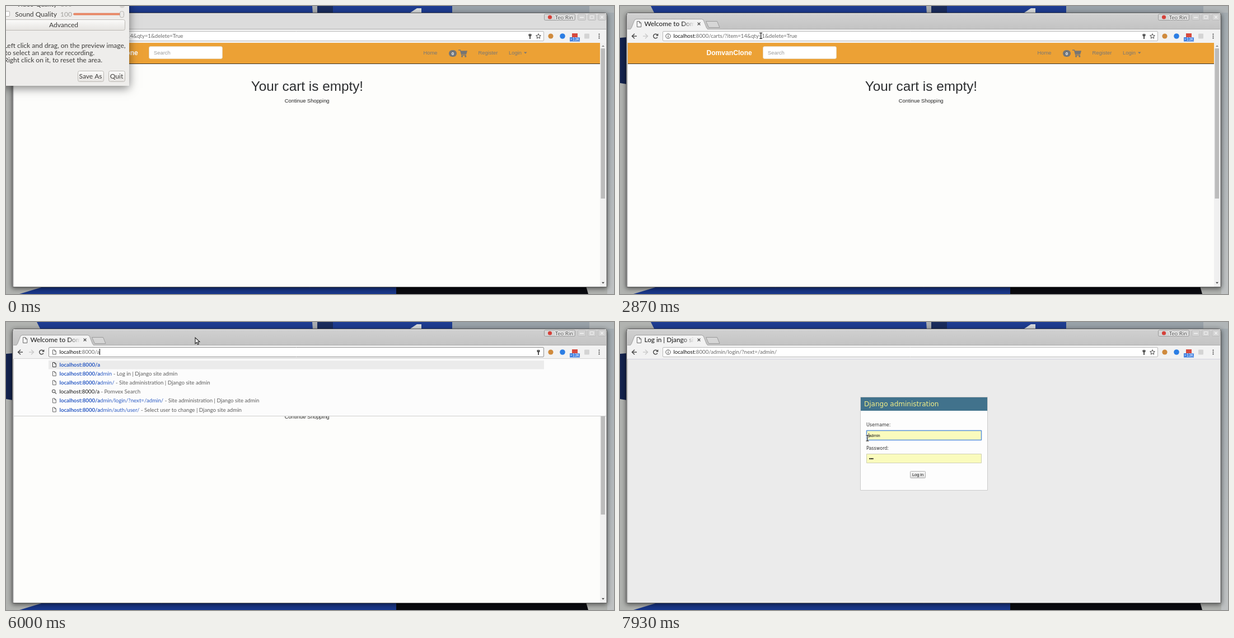
Write an HTML page with a canvas that moves like this. It is 1086x516 px and loops after 8 s.

```html
<!DOCTYPE html>
<html lang="en">
<head>
<meta charset="utf-8">
<title>Cart and admin login</title>
<style>
html, body { margin: 0; width: 100%; height: 100%; overflow: hidden; background: #b0b2b0; }
canvas { display: block; }
</style>
</head>
<body>
<canvas id="stage" width="1086" height="516"></canvas>
<script>
const ctx = document.getElementById('stage').getContext('2d');
const LOOP = 8000;
const UI = 'Lato, "Open Sans", sans-serif';
const WEB = '"Liberation Sans", Arial, sans-serif';
const ADMIN = '"DejaVu Sans", Verdana, sans-serif';
const URL_FONT = '9.66px ' + UI;
const URL_X = 95.5;

const HOST = 'localhost';
const BASE = ':8000/';
const CART = 'carts/?item=14&qty=1&delete=True';

const SELECT = 3600, DESELECT = 4200, ERASE = 4470, ERASED = 5330;
const ENTER = 6600, LOADED = 6740;
const KEYS = [6000, 6130, 6270, 6400, 6490];

const MOUSE = [
  [700, -12, 95], [1730, 174, 38], [2000, 174, 38], [2600, 215, 53],
  [3330, 333, 54], [3600, 333, 54], [4200, 348, 54], [5450, 348, 54],
  [5600, 338, 28], [7380, 338, 28], [7530, 400, 135], [7650, 400, 135],
  [7920, 442, 208]
];

const HINTS = [
  ['admin', 'Log in | Django site admin'],
  ['admin/', 'Site administration | Django site admin'],
  null,
  ['admin/login/?next=/admin/', 'Site administration | Django site admin'],
  ['admin/auth/user/', 'Select user to change | Django site admin']
];

function rect(x, y, w, h, fill) {
  ctx.fillStyle = fill;
  ctx.fillRect(x, y, w, h);
}

function box(x, y, w, h, r, fill, stroke, width = 1) {
  ctx.beginPath();
  ctx.roundRect(x, y, w, h, r);
  if (fill) { ctx.fillStyle = fill; ctx.fill(); }
  if (stroke) { ctx.strokeStyle = stroke; ctx.lineWidth = width; ctx.stroke(); }
}

function poly(points, fill, stroke, width = 1) {
  ctx.beginPath();
  for (let i = 0; i < points.length; i += 2) ctx.lineTo(points[i], points[i + 1]);
  ctx.closePath();
  if (fill) { ctx.fillStyle = fill; ctx.fill(); }
  if (stroke) { ctx.strokeStyle = stroke; ctx.lineWidth = width; ctx.stroke(); }
}

function line(points, color, width = 1) {
  ctx.beginPath();
  for (let i = 0; i < points.length; i += 2) ctx.lineTo(points[i], points[i + 1]);
  ctx.strokeStyle = color;
  ctx.lineWidth = width;
  ctx.stroke();
}

function arc(x, y, r, color, width, from = 0, to = Math.PI * 2) {
  ctx.beginPath();
  ctx.arc(x, y, r, from, to);
  ctx.strokeStyle = color;
  ctx.lineWidth = width;
  ctx.stroke();
}

function disc(x, y, r, fill) {
  ctx.beginPath();
  ctx.arc(x, y, r, 0, Math.PI * 2);
  ctx.fillStyle = fill;
  ctx.fill();
}

// Draws text and returns the x where it ends.
function text(str, x, y, font, fill, align = 'left') {
  ctx.font = font;
  ctx.fillStyle = fill;
  ctx.textAlign = align;
  ctx.fillText(str, x, y);
  return x + ctx.measureText(str).width;
}

function vertical(y0, y1, a, b) {
  const g = ctx.createLinearGradient(0, y0, 0, y1);
  g.addColorStop(0, a);
  g.addColorStop(1, b);
  return g;
}

function cross(x, y, r, color, width) {
  line([x - r, y - r, x + r, y + r], color, width);
  line([x + r, y - r, x - r, y + r], color, width);
}

function mouseAt(t) {
  if (t < MOUSE[0][0]) return null;
  for (let i = 1; i < MOUSE.length; i++) {
    const [t0, x0, y0] = MOUSE[i - 1], [t1, x1, y1] = MOUSE[i];
    if (t < t1) {
      const p = (t - t0) / (t1 - t0), e = p * p * (3 - 2 * p);
      return { x: x0 + (x1 - x0) * e, y: y0 + (y1 - y0) * e };
    }
  }
  const [, x, y] = MOUSE[MOUSE.length - 1];
  return { x, y };
}

function pathAt(t) {
  if (t >= LOADED) return 'admin/login/?next=/admin/';
  if (t >= ENTER) return 'admin';
  if (t >= KEYS[0]) return 'admin'.slice(0, KEYS.filter(k => t >= k).length);
  if (t < ERASE) return CART;
  const gone = Math.ceil(CART.length * (t - ERASE) / (ERASED - ERASE));
  return CART.slice(0, Math.max(0, CART.length - gone));
}

function caretOn(t) {
  if (t < DESELECT || t >= ENTER) return false;
  if (t >= ERASE && t < ERASED || t >= KEYS[0]) return true;
  const since = t < ERASE ? t - DESELECT : t - ERASED;
  return since % 1000 < 500;
}

function drawDesktop() {
  rect(0, 0, 1086, 516, '#b1b3b0');
  poly([55, 0, 797, 0, 797, 14, 62, 14], '#1e3c90');
  poly([547, 0, 556, 0, 556, 14, 548, 14], '#a9acaf');
  rect(556, 0, 28, 14, '#1a2c5c');
  poly([722, 12, 734, 4, 742, 4, 742, 14, 722, 14], '#d8dbdc');
  rect(797, 0, 245, 14, '#98a1a8');
  rect(1042, 0, 44, 14, '#b0b5b7');
  poly([0, 57, 12, 56, 12, 140, 0, 138], '#14234e');
  rect(1074, 12, 12, 504, vertical(12, 504, '#a3abb0', '#bfc2c3'));
  poly([70, 502, 698, 502, 698, 516, 24, 516], '#19378a');
  poly([697, 502, 1036, 502, 1040, 516, 697, 516], '#0a0b10');
}

function pageIcon(x, y, h, color) {
  const w = h * 0.72, f = h * 0.3;
  poly([x, y, x + w - f, y, x + w, y + f, x + w, y + h, x, y + h], '#fff', color, 1);
  line([x + w - f, y, x + w - f, y + f, x + w, y + f], color, 1);
}

function drawFrame(t, mouse) {
  const active = t > 200;
  ctx.save();
  ctx.shadowColor = 'rgba(0,0,0,.55)';
  ctx.shadowBlur = 9;
  ctx.shadowOffsetY = 2;
  box(11.5, 12.5, 1062, 491, [4, 4, 1, 1], '#c9c9c9', '#5a5a5a');
  ctx.restore();
  rect(13, 14, 1059, 28, active ? vertical(14, 42, '#d0d0d0', '#c3c3c3') : '#dcdcdc');
  line([13, 13.5, 1072, 13.5], '#ececec');

  box(961.5, 14.5, 55, 11, 2, '#d6d6d6', '#9a9a9a');
  disc(971.5, 20, 3.6, '#d5413a');
  ctx.font = '10px ' + UI;
  ctx.strokeStyle = '#f5f5f5';
  ctx.lineWidth = 2;
  ctx.textAlign = 'left';
  ctx.strokeText('Teo Rin', 980.5, 23.5);
  text('Teo Rin', 980.5, 23.5, '10px ' + UI, '#4a4a4a');
  for (let i = 0; i < 3; i++) box(1021.5 + 18 * i, 14.5, 14, 11, 2, '#d2d2d2', '#bcbcbc');
  line([1025, 20.5, 1032, 20.5], '#f4f4f4', 1.5);
  box(1043.5, 17.5, 6, 5, 0, null, '#f0f0f0');
  cross(1064.5, 20, 2.5, '#f0f0f0', 1.4);

  const hover = mouse && mouse.x > 154 && mouse.x < 178 && mouse.y > 27 && mouse.y < 40;
  poly([153.5, 27.5, 173.5, 27.5, 178, 38.5, 158.5, 38.5], hover ? '#bababa' : '#d6d6d6', '#9b9b9b');
  rect(13, 41, 1059, 1, '#adadad');
  poly([17.5, 42.5, 20.5, 39, 26, 25, 29, 23.5, 146, 23.5, 149, 25, 154.5, 39, 157.5, 42.5], '#f2f2f2', '#a2a2a2');
  rect(13, 42, 1059, 24, '#f2f2f2');

  if (t >= ENTER && t < LOADED) arc(34, 32, 3.8, '#8b8b8b', 1, t / 90, t / 90 + 1);
  else pageIcon(30.5, 27.5, 10, '#666');
  ctx.save();
  ctx.beginPath();
  ctx.rect(42, 24, 91, 17);
  ctx.clip();
  text(t < LOADED ? 'Welcome to DomvanClone' : 'Log in | Django site admin', 43.5, 35.5, '11.8px ' + UI, '#161616');
  const fade = ctx.createLinearGradient(110, 0, 133, 0);
  fade.addColorStop(0, 'rgba(242,242,242,0)');
  fade.addColorStop(1, '#f2f2f2');
  rect(110, 24, 24, 17, fade);
  ctx.restore();
  cross(141, 32, 2.4, '#444', 1.3);
}

function arrowIcon(x, y, dir, color) {
  line([x - 4.5 * dir, y, x + 4 * dir, y], color, 1.4);
  line([x, y - 4.3, x - 4.5 * dir, y, x, y + 4.3], color, 1.4);
}

function keyIcon(x) {
  box(x - 2.5, 50, 5, 4, 1, '#444');
  rect(x - 0.9, 53, 1.8, 6, '#444');
  rect(x - 0.6, 51, 1.2, 1, '#fff');
}

function drawToolbar(t) {
  arrowIcon(26, 54, 1, '#444');
  arrowIcon(45, 54, -1, '#c9c9c9');
  if (t >= ENTER && t < LOADED) {
    cross(64, 54, 3.8, '#444', 1.5);
  } else {
    arc(63.5, 54, 3.8, '#444', 1.5, 0.5, 5.6);
    poly([68.3, 49.2, 68.3, 53.4, 64.1, 53.4], '#444');
  }

  const editing = t >= ERASE && t < ENTER;
  const focused = t >= SELECT && t < ENTER;
  box(76.5, 45.5, 884, 17, 1.5, '#fff', focused ? '#8f8f8f' : '#b9b9b9');
  if (editing) {
    pageIcon(83.5, 50, 8, '#666');
    keyIcon(951);
  } else {
    arc(86, 54, 4.2, '#555', 1);
    rect(85.4, 53.3, 1.2, 3.2, '#555');
    rect(85.4, 51.3, 1.2, 1.2, '#555');
    keyIcon(936);
    const star = [];
    for (let i = 0; i < 10; i++) {
      const a = i * Math.PI / 5 - Math.PI / 2, r = i % 2 ? 2.1 : 4.6;
      star.push(951 + r * Math.cos(a), 54.3 + r * Math.sin(a));
    }
    poly(star, null, '#444', 1);
  }

  const path = pathAt(t), selected = t >= SELECT && t < DESELECT;
  if (selected) {
    ctx.font = URL_FONT;
    rect(URL_X, 48, ctx.measureText(HOST + BASE + path).width, 11.5, '#b5d3f3');
  }
  let end = text(HOST, URL_X, 57, URL_FONT, '#111');
  end = text(BASE + path, end, 57, URL_FONT, selected ? '#222' : '#686868');
  if (caretOn(t)) rect(Math.round(end), 48, 1, 11, '#111');

  disc(973, 54, 4.6, '#cf8a3d');
  disc(994, 54, 4.8, '#2b7de4');
  rect(1011, 49, 10, 8, '#d64a3f');
  rect(1007, 56, 18, 7.5, '#3f7fe0');
  text('>13K', 1016, 62.4, '7px ' + UI, '#fff', 'center');
  box(1033, 49.5, 9, 9, 1, '#d4d4d4');
  for (let i = -1; i < 2; i++) disc(1059.5, 54 + 3.4 * i, 1.05, '#444');
}

function drawCart() {
  const gray = '#757575';
  line([808, 79, 811.5, 79, 814, 88, 822, 88], gray, 1.3);
  poly([811.5, 80.3, 824, 80.3, 822.2, 86.4, 813.4, 86.4], gray);
  disc(814.6, 90.3, 1.5, gray);
  disc(820.8, 90.3, 1.5, gray);
}

function drawShop() {
  const small = '9.4px ' + WEB, gray = '#777';
  rect(14, 66, 1058, 437, '#fdfdfb');
  rect(14, 66, 1047, 37, '#eca135');
  rect(14, 103, 1047, 1, '#3c342a');
  text('DomvanClone', 154.5, 87.5, 'bold 12.1px ' + WEB, '#fff');
  box(255.5, 72.5, 131, 22, 2.7, '#fff', '#e6d6ba');
  text('Search', 264, 87, small, '#999');
  text('Home', 745.5, 87, small, gray);
  box(791, 79, 14, 12, 6, '#71757a');
  text('0', 798, 88, 'bold 8px ' + WEB, '#fff', 'center');
  drawCart();
  text('Register', 843.5, 87, small, gray);
  text('Login', 898, 87, small, gray);
  poly([925, 82.6, 930.6, 82.6, 927.8, 85.4], gray);
  text('Your cart is empty!', 537.9, 152, '24.3px ' + WEB, '#2c2e30', 'center');
  text('Continue Shopping', 537.7, 173.3, small, '#222', 'center');

  rect(1061, 66, 11, 437, '#f0f0f0');
  rect(1062.5, 76, 7.5, 269, '#bcbcbc');
  poly([1064, 73, 1069, 73, 1066.5, 70.3], '#888');
  poly([1064, 494.8, 1069, 494.8, 1066.5, 497.5], '#444');
}

function drawHints(typed) {
  const bold = 'bold ' + URL_FONT, blue = '#2b5bc4', gray = '#5c5c5c';
  const prefix = HOST + BASE + typed;
  rect(14, 66, 1058, 102, '#fcfcfc');
  rect(14, 65, 1058, 1, '#d4d4d4');
  rect(14, 168, 1058, 1, '#cfcfcf');
  rect(76, 69, 885, 15.5, '#ebebeb');
  pageIcon(83.5, 72.5, 8, '#333');
  text(prefix, URL_X, 80, bold, blue);
  HINTS.forEach((hint, i) => {
    const y = 96.1 + 16.1 * i;
    if (!hint) {
      arc(85.2, y - 4.3, 2.7, '#666', 1.2);
      line([87.2, y - 2.3, 90, y + 0.5], '#666', 1.4);
      const x = text(prefix, URL_X, y, URL_FONT, '#111');
      text(' - Pomvex Search', x, y, URL_FONT, gray);
      return;
    }
    pageIcon(83.5, y - 7.5, 8, '#666');
    let x = text(prefix, URL_X, y, bold, blue);
    x = text(hint[0].slice(typed.length), x, y, URL_FONT, blue);
    text(' - ' + hint[1], x, y, URL_FONT, gray);
  });
}

function drawLogin(t) {
  const label = '8px ' + ADMIN, field = '7.4px ' + WEB;
  rect(14, 66, 1058, 437, '#ebebeb');
  rect(14, 66, 1058, 1, '#d2d2de');
  box(429.5, 134.5, 227, 167, 0, '#fdfdfd', '#cbcbcb');
  rect(430, 135, 226, 24, '#41728c');
  text('Django administration', 436, 151, '12px ' + ADMIN, '#f2ee86');
  text('Username:', 440, 187, label, '#333');
  text('Password:', 440, 229, label, '#333');
  box(440.5, 194.5, 205, 17, 0.5, '#fafbbd', '#5c93dc', 1.5);
  box(440.5, 236.5, 205, 16, 0, '#fafbbd', '#cfcfb4');
  text('admin', 444.5, 205.5, field, '#111');
  for (let i = 0; i < 3; i++) disc(446.3 + 2.6 * i, 245, 1.15, '#111');
  if ((t - LOADED) % 1000 < 500) rect(444, 199, 0.8, 8, '#222');
  box(518.5, 267.5, 27, 12, 1, vertical(267, 280, '#f8f8f8', '#dedede'), '#b0b0b0');
  text('Log in', 532, 276.4, field, '#111', 'center');
}

function button(x, y, w, h, label) {
  box(x + 0.5, y + 0.5, w, h, 3, vertical(y, y + h, '#fcfcfb', '#e6e4e1'), '#bdbab5');
  text(label, x + w / 2, y + h / 2 + 4.3, '12px ' + UI, '#3c3b39', 'center');
}

function drawRecorder(t) {
  const alpha = 1 - Math.max(0, t - 70) / 200;
  if (alpha <= 0) return;
  const font = '12px ' + UI, ink = '#3c3b39';
  ctx.save();
  ctx.globalAlpha = alpha;
  ctx.save();
  ctx.shadowColor = 'rgba(0,0,0,.5)';
  ctx.shadowBlur = 16;
  ctx.shadowOffsetY = 4;
  rect(-20, -20, 240, 163, '#eeedeb');
  ctx.restore();
  text('Video Quality', 91, 1, font, ink, 'right');
  text('100', 97, 1, font, '#a3a19e');
  disc(207.5, -1, 4.5, '#d6d4d1');
  box(-2.5, 9.5, 9, 9, 1.5, '#fff', '#b3b0ac');
  text('Sound Quality', 91, 19, font, ink, 'right');
  text('100', 97, 19, font, '#a3a19e');
  box(120.5, 13, 88, 3, 1.5, '#ee8a68', '#d8795a', 0.8);
  box(203.5, 9.5, 7, 11, 3, '#ecebe9', '#b5b2ae');
  button(-6, 24, 218, 19, 'Advanced');
  text('Left click and drag, on the preview image,', 213.5, 74.5, font, ink, 'right');
  text('to select an area for recording.', 158, 87.5, font, ink, 'right');
  text('Right click on it, to reset the area.', 172, 100.5, font, ink, 'right');
  button(128, 116, 46, 19, 'Save As');
  button(183, 116, 29, 19, 'Quit');
  ctx.restore();
}

function drawMouse(t, { x, y }) {
  const inUrl = x > 76 && x < 925 && y > 45 && y < 63;
  const inField = t >= LOADED && x > 440 && x < 646 && y > 194 && y < 212;
  if (inUrl || inField) {
    for (const [color, w] of [['#fff', 3], ['#2a2a2a', 1.3]]) {
      line([x, y - 5, x, y + 5], color, w);
      line([x - 2.5, y - 5, x + 2.5, y - 5], color, w);
      line([x - 2.5, y + 5, x + 2.5, y + 5], color, w);
    }
    return;
  }
  ctx.save();
  ctx.translate(x, y);
  poly([0, 0, 0, 10.8, 2.6, 8.5, 4.5, 12.4, 6.3, 11.6, 4.5, 7.8, 7.9, 7.6], '#fff', '#222', 1.1);
  ctx.restore();
}

function draw(t) {
  const mouse = mouseAt(t);
  drawDesktop();
  drawFrame(t, mouse);
  drawToolbar(t);
  if (t >= LOADED) drawLogin(t);
  else drawShop();
  if (t >= KEYS[0] && t < ENTER) drawHints(pathAt(t));
  drawRecorder(t);
  if (mouse) drawMouse(t, mouse);
}

const start = performance.now();
function tick() {
  draw((performance.now() - start) % LOOP);
  requestAnimationFrame(tick);
}
tick();
</script>
</body>
</html>
```
